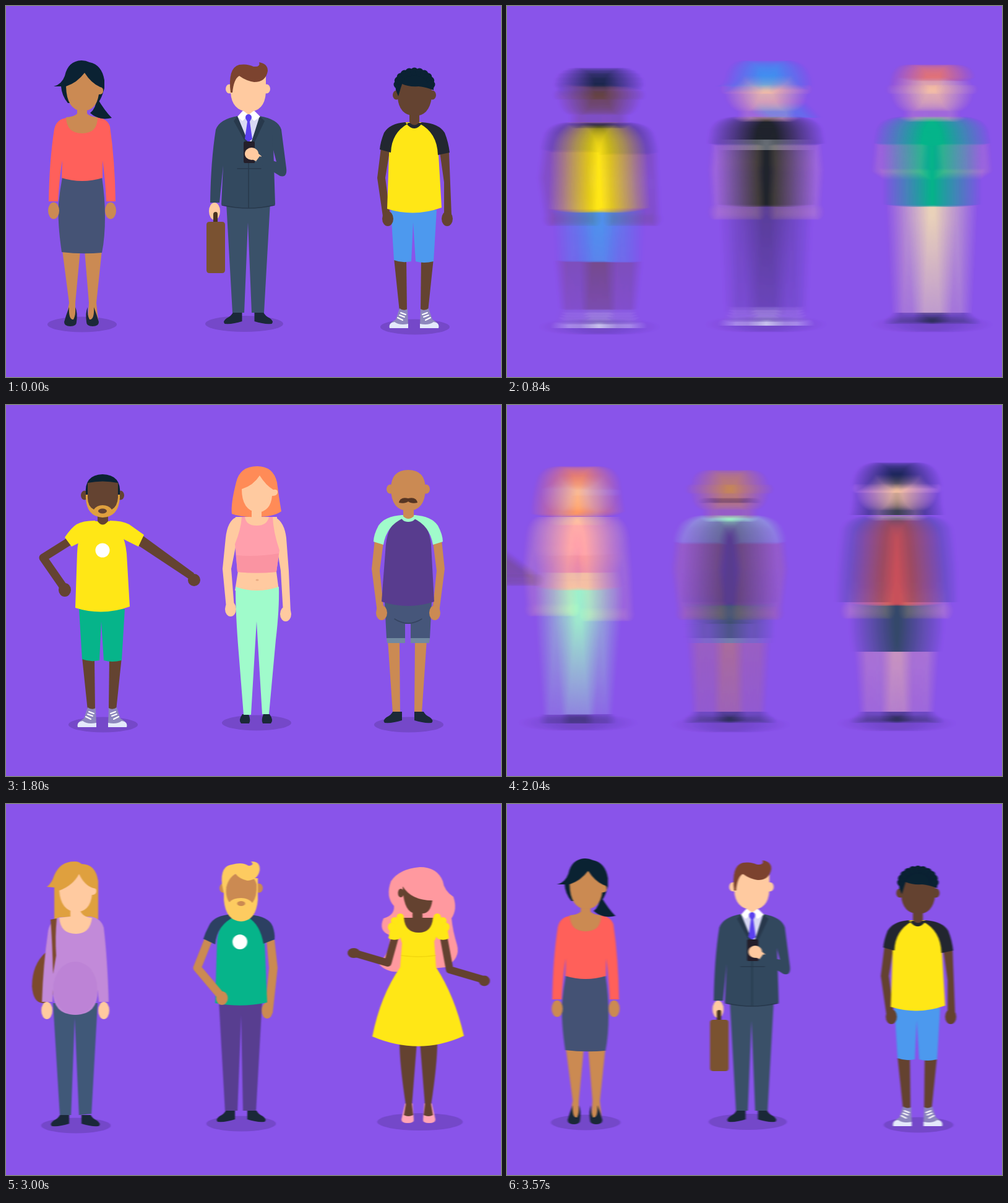
An HTML page with a canvas that plays this animation: 800x600 px, repeating every 3600 ms.

```html
<!DOCTYPE html>
<html lang="en">
<head>
<meta charset="utf-8">
<title>Character parade</title>
<style>
html, body { margin: 0; width: 100%; height: 100%; overflow: hidden; background: #8954ea; }
canvas { display: block; width: 800px; height: 600px; }
</style>
</head>
<body>
<canvas id="stage" width="800" height="600"></canvas>
<script>
const MARGIN = 100, BG = '#8954ea';
const PEACH = '#ffcaa0', TAN = '#cb8a53', BROWN = '#644331';
const INK = '#0b2233', SHOE = '#1b2938', YELLOW = '#ffe716', MINT = '#a0fbcb', GREEN = '#06b48a';

const stage = document.getElementById('stage').getContext('2d');
const makeLayer = () => {
  const c = document.createElement('canvas');
  c.width = 800 + 2 * MARGIN;
  c.height = 600;
  return c.getContext('2d');
};
let front = makeLayer(), back = makeLayer();
let g = front;

// Drawing helpers
const fill = (color, d) => { g.fillStyle = color; g.fill(new Path2D(d)); };
const oval = (color, x, y, rx, ry) => {
  g.fillStyle = color;
  g.beginPath();
  g.ellipse(x, y, rx, ry, 0, 0, 7);
  g.fill();
};
const line = (color, width, d) => {
  g.strokeStyle = color;
  g.lineWidth = width;
  g.lineJoin = g.lineCap = 'round';
  g.stroke(new Path2D(d));
};
const shifted = (x, y, draw) => { g.save(); g.translate(x, y); draw(); g.restore(); };
const both = (axis, draw) => {
  draw();
  g.save();
  g.translate(2 * axis, 0);
  g.scale(-1, 1);
  draw();
  g.restore();
};
const pair = (axis, color, d) => both(axis, () => fill(color, d));
const pairOval = (axis, color, dx, y, rx, ry) => both(axis, () => oval(color, axis - dx, y, rx, ry));
const shadow = (x, y, rx = 56, ry = 12.5) => oval('#7548c9', x, y, rx, ry);

// Shared body parts
const boots = (x, dy = 0) => shifted(x, dy, () =>
  pair(0, SHOE, 'M-25 496H-10V510Q-25 515-38 514Q-42 510-35 505Q-27 501-25 496Z'));
const sneakers = (x, dy = 0) => shifted(x, dy, () => both(-1.5, () => {
  fill('#8d87bd', 'M-25 489Q-18 494-12 490L-11 517Q-11 521-21 521H-41Q-44 514-31 507Z');
  fill('#e4e9fb', 'M-41 521Q-43 512-33 511Q-25 517-11 514V521Z');
  line('#fff', 2, 'M-28 504L-20 508M-25 500L-17 503M-23 496L-15 499');
}));
const slimLegs = (x, color) => shifted(x, 0, () =>
  pair(-2, color, 'M-34 408H-14L-13 494H-25Z'));
const shorts = (x, color) => fill(color,
  `M${x - 39} 330h74l-5 83q-16 4-29 0l-4-63l-3 63q-15 3-28-2Z`);
const tee = (x, color) => fill(color,
  `M${x - 16} 188q-25 12-26 52l-3 88q44 14 88-2l-5-86q-4-40-27-52Z`);
const ears = (x, y, dx, color) => pairOval(x, color, dx, y, 6, 7.5);

// Short-lived figures that pass between the stops
function walker(o) {
  const waist = o.waist || 321;
  shadow(0, 515);
  if (o.hem) {
    pair(0, o.skin, 'M-34 375H-12L-11 499H-25Z');
    fill(o.bottom, o.skirt
      ? `M-37 315H37Q42 360 34 ${o.hem}H-34Q-42 360-37 315Z`
      : `M-39 320H38L34 ${o.hem}H4L0 352L-4 ${o.hem}H-34Z`);
  } else fill(o.bottom, `M-36 ${waist}H36L27 499H7L0 345L-7 499H-27Z`);
  o.sneakers ? sneakers(1.5, -4) : boots(0);
  if (o.mane) fill(o.hair, o.mane);
  if (o.folded) both(0, () => line(o.skin, 12, 'M-50 220L-54 265L-8 296'));
  else {
    pair(0, o.skin, 'M-51 215L-56 265L-51 335H-38L-43 268L-36 222Z');
    pairOval(0, o.skin, 47, 333, 9, 13);
  }
  fill(o.top, `M-15 181Q-38 190-41 225L-40 ${waist}Q0 ${waist + 8} 40 ${waist}L41 225Q38 190 15 181Z`);
  if (o.band) {
    const [color, y, height] = o.band;
    g.fillStyle = color;
    g.fillRect(-38, y, 76, height);
  }
  pair(0, o.sleeve || o.top, o.long
    ? 'M-12 179Q-45 180-53 200Q-62 260-62 319H-44L-36 230Q-36 195-11 182Z'
    : 'M-12 179Q-45 180-52 200L-56 222L-38 227Q-36 195-11 182Z');
  fill(o.skin, 'M-8 160H8V178Q14 180 16 181Q0 194-16 181Q-12 180-8 178Z');
  ears(0, 135, 30, o.skin);
  oval(o.skin, 0, 139, 29, 33);
  fill(o.hair, o.cut || 'M-30 130Q-30 96-6 95Q28 92 31 115Q22 124 8 121Q-8 120-16 115Q-25 120-26 138Z');
}
const CURLS = 'M0 96Q-44 98-50 135Q-36 155-58 180Q-72 200-54 220Q-74 250-48 270H48Q74 248 55 222Q50 200 52 185Q76 168 64 150Q46 140 44 122Q34 96 0 96Z';
const LONG_HAIR = 'M0 93Q-32 94-36 130Q-34 160-40 178H40Q34 150 36 128Q30 93 0 93Z';
const FRINGE = 'M-30 140Q-34 94 0 93Q34 94 30 136Q12 130 2 112Q-8 130-30 140Z';

// The nine people shown at the stops
function teacher() {
  shadow(123, 515);
  fill(TAN, 'M91 395H120L112 480V508H97L102 480ZM127 395H155L146 480L149 508H132L134 480Z');
  pair(122, SHOE, 'M102 487Q97 500 94 511Q94 518 104 518Q114 518 114 511Q116 496 112 487Q113 500 109 507Q101 508 102 487Z');
  fill('#455375', 'M91 277H155Q160 310 160 340Q160 375 155 399Q122 402 90 398Q83 350 85 320Q87 298 91 277Z');
  pairOval(123, TAN, 46, 331, 9, 13.5);
  fill('#ff605b', 'M99 181Q82 182 78 199Q70 250 69 316H84Q87 270 91 250L90 278Q123 288 156 278V250Q160 275 162 316H177Q176 250 168 195Q164 182 147 180Z');
  fill(INK, 'M148 150Q160 170 171 181Q150 186 136 173Q146 165 146 150ZM77 130Q90 127 95 113Q100 89 122 88Q129 88 135 91Q155 95 159 120V133Q155 148 150 155L100 157Q90 145 89 130Z');
  fill(TAN, 'M97 180Q98 206 123 206Q148 206 148 180Q135 179 131 174V160H115V174Q111 179 97 180Z');
  fill(TAN, 'M97 130Q115 124 127 108Q138 125 152 131Q158 132 157 138Q157 143 150 143Q146 170 123 170Q98 168 97 130Z');
}

function banker() {
  const suit = '#33495f', dark = '#28394c';
  shadow(385, 514, 63, 13);
  boots(391.5);
  fill('#3a5169', 'M356 318H427L417 496H397L391 350L385 496H366Z');
  oval(PEACH, 337, 332, 9, 14);
  fill('#49331f', 'M335 349V337Q335 333 339 333Q342 333 342 337V349Z');
  fill('#7a5231', 'M329 349H349Q354 349 354 354V427Q354 432 349 432H329Q324 432 324 427V354Q324 349 329 349Z');
  fill(suit, 'M374 178Q345 183 339 200Q331 250 330 318H345L351 258L348 321Q392 333 435 321L432 225L445 200Q440 183 410 178Z');
  line(dark, 1.5, 'M349 322Q392 332 434 322M392 220V326M374 263H412');
  fill('#d9d9f4', 'M374 180H411L397 219H388Z');
  fill(dark, 'M374 178L391 219L389 224L368 186ZM410 178L397 219L400 224L418 186Z');
  fill('#5b40ee', 'M387 181Q392 173 397 181L394 187L398 215L392 220L386 215L390 187Z');
  fill(PEACH, 'M384 158H400V176L392 179L384 176Z');
  fill('#fff', 'M374 179L383 169L392 176L401 169L411 179L401 186L392 177L382 186Z');
  oval('#5b40ee', 392, 180, 5, 5);
  fill('#241f2a', 'M386 219H400Q402 219 402 222V254H386Q384 254 384 251V222Q384 219 386 219Z');
  oval(PEACH, 397, 239, 11, 10);
  fill(PEACH, 'M398 248L406 237L413 243L406 252Z');
  fill(suit, 'M432 190L445 200L453 262Q455 278 443 275L404 251L410 243L437 252L430 225Z');
  ears(391, 134, 30, PEACH);
  fill(PEACH, 'M363 112H420V140Q418 171 391 171Q365 169 363 140Z');
  fill('#7c432f', 'M363 140Q358 100 377 95Q390 93 400 98Q412 99 409 91Q423 93 423 105Q420 123 401 123Q388 121 377 113Q368 118 366 140Z');
}

function student() {
  shadow(661, 519);
  slimLegs(661, BROWN);
  sneakers(661);
  shorts(661, '#4d99ee');
  fill(BROWN, 'M606 230L600 278L609 340H621L613 278L620 235ZM701 236L708 285V338H720L716 236Z');
  pairOval(665, BROWN, 48, 344, 9, 12);
  tee(661, YELLOW);
  fill('#222730', 'M645 188Q620 190 611 205Q605 220 604 232L622 237Q623 205 650 190ZM672 188Q700 190 709 205Q715 220 717 237L698 241Q697 205 668 190ZM646 189H673Q660 207 646 189Z');
  fill(BROWN, 'M652 165H668V188Q660 197 652 188Z');
  ears(660, 144, 29, BROWN);
  fill(BROWN, 'M633 122H688V148Q684 178 660 178Q635 176 633 148Z');
  fill(INK, 'M630 136Q626 110 650 104H672Q694 112 691 136Q678 131 667 130Q650 131 640 126L634 146Z');
  for (let i = 0; i < 11; i++) {
    const a = Math.PI * (1 + i / 10);
    oval(INK, 660 + 27 * Math.cos(a), 127 + 21 * Math.sin(a), 6.5, 6.5);
  }
}

function dancer() {
  shadow(157, 517);
  slimLegs(157, BROWN);
  sneakers(157);
  shorts(157, GREEN);
  line(BROWN, 13, 'M103 220L60 247L94 296');
  fill(BROWN, 'M222 212L304 272L298 283L212 226Z');
  oval(BROWN, 95, 299, 10, 11);
  oval(BROWN, 304, 283, 10, 10);
  tee(157, YELLOW);
  fill(YELLOW, 'M144 187Q124 187 114 193Q106 198 95 214L106 229L122 221L150 200ZM168 187Q188 187 199 193L223 210L214 229L192 218L164 200Z');
  fill(BROWN, 'M148 170H165V188Q156 199 148 188Z');
  oval('#fff', 156, 235, 11.5, 11.5);
  ears(156, 146, 29, BROWN);
  fill('#dfa03e', 'M129 135H184V150Q182 181 156 182Q130 180 129 150Z');
  fill(INK, 'M129 145Q126 113 156 112Q187 113 184 145Z');
  fill(BROWN, 'M132 126Q156 121 181 126V150Q180 164 171 169Q166 162 156 162Q147 162 142 169Q132 164 132 150Z');
  oval(BROWN, 156, 171.5, 7, 4);
}

function runner() {
  shadow(405, 514);
  pair(404, SHOE, 'M382 500H392Q396 510 393 515H380Q375 510 382 500Z');
  fill(PEACH, 'M371 182Q358 188 355 215L350 265L356 328H369L364 265L372 225ZM436 182Q450 190 453 215L457 268L460 335H448L444 268L437 225Z');
  oval(PEACH, 363, 330, 9, 12);
  oval(PEACH, 452, 338, 9, 12);
  fill(PEACH, 'M371 181H438V225L436 262L441 300H370L376 262L370 225Z');
  fill(MINT, 'M371 294Q405 306 441 294Q442 330 436 380L425 500H414L405 350L396 501H384L376 400Q371 340 371 294Z');
  oval('#e9ab83', 406, 283, 2.5, 1.5);
  fill('#ff9fac', 'M381 181Q380 200 370 225L374 270Q405 273 437 270L442 235Q432 205 431 181H425Q422 195 405 195Q388 195 386 181Z');
  fill('#fa94a2', 'M372 243Q405 246 441 240L437 270Q405 273 374 270Z');
  fill('#ff8b57', 'M406 99Q378 99 372 125Q363 160 365 176Q380 182 405 181Q432 181 445 172Q441 150 438 125Q432 99 406 99Z');
  fill(PEACH, 'M397 165H413V184H397Z');
  fill(PEACH, 'M381 136Q400 130 410 114Q420 130 432 137Q440 136 439 142Q438 147 430 147Q428 172 406 174Q381 170 381 136Z');
}

function uncle() {
  shadow(651, 517);
  pair(648.5, TAN, 'M617 380H636L637 498H625Z');
  boots(650);
  fill('#46567a', 'M612 318H688L685 378H654V354H645V378H615Z');
  fill('#7289a0', 'M615 377H645V385H616ZM654 377H685L684 385H654Z');
  line('#35445f', 1.5, 'M628 346Q650 360 672 346');
  pair(650, TAN, 'M596 218L591 265L600 335H611L604 268L610 222Z');
  pairOval(650, TAN, 43, 336, 9, 12);
  fill('#583c8e', 'M640 182Q618 190 614 225L607 318Q650 332 692 318L687 225Q683 190 662 182Z');
  pair(650, MINT, 'M640 178Q612 180 602 195Q594 210 594 221L610 226Q615 195 642 183Z');
  fill(MINT, 'M638 178H663Q662 189 650 189Q639 189 638 178Z');
  fill(TAN, 'M642 162H659V180Q650 188 642 180Z');
  ears(650, 136, 29, TAN);
  fill(TAN, 'M622 136Q622 105 650 105Q678 105 678 136Q677 171 650 171Q623 171 622 136Z');
  pair(650, '#563523', 'M650 151Q637 148 635 158Q645 160 650 156Z');
}

function mother() {
  const lilac = '#c28ad9', navy = '#405879';
  shadow(113, 520);
  boots(112, 7);
  fill(navy, 'M76 322H148L138 501L118 503L111 345L105 503H87Z');
  fill('#7c4a2c', 'M64 240Q42 260 42 295Q44 322 60 322Q78 320 78 290Z');
  pairOval(112, PEACH, 46, 334, 9, 14);
  fill('#dfa03f', 'M66 134Q74 128 78 115Q88 92 112 93Q118 93 122 97Q145 97 149 125V187H78V135Z');
  fill(lilac, 'M88 183Q72 186 68 205Q60 260 58 320H75L76 300Q75 341 112 341Q149 341 148 300L150 320H166Q164 250 158 200Q154 185 137 182Z');
  oval('#bd83d6', 112, 298, 35, 43);
  fill('#7c4a2c', 'M72 187L82 185Q79 215 81 245L76 275Q75 225 72 187Z');
  fill(PEACH, 'M86 184Q88 210 113 210Q136 210 139 184Q120 183 118 165H104V182Z');
  fill(PEACH, 'M86 140Q108 132 118 113Q127 132 141 136Q147 136 146 142Q145 147 139 147Q136 174 113 175Q88 172 86 140Z');
}

function designer() {
  shadow(380, 517);
  boots(380);
  fill('#583e90', 'M344 318H414L404 496H383L380 340L374 496H354Z');
  fill(TAN, 'M421 220H434L439 265L431 338H418L425 265Z');
  oval(TAN, 422, 334, 9, 13);
  fill(GREEN, 'M365 181Q342 195 341 225L338 322Q380 330 422 321L418 225Q412 195 395 182Z');
  line(TAN, 13, 'M326 222L309 265L346 309');
  oval(TAN, 349, 314, 9.5, 11);
  fill('#2c4063', 'M367 178Q335 180 328 197Q322 208 319 218L338 227Q341 195 370 182ZM394 179Q425 182 431 198Q435 210 434 219L416 226Q411 195 391 183Z');
  oval('#fff', 378, 223, 12, 12);
  ears(380, 136, 29, TAN);
  fill('#fdcb61', 'M352 120H407V155Q404 189 380 190Q355 189 352 155Z');
  fill(TAN, 'M357 128Q362 112 380 112Q400 112 405 130Q406 150 398 160Q392 152 380 152Q366 152 361 159Q353 148 357 128Z');
  oval(TAN, 380, 161, 6.5, 4);
  fill('#fdcb61', 'M349 130Q346 100 365 98Q382 93 392 100Q402 99 396 93Q411 92 410 107Q407 123 390 124Q377 121 371 113Q358 120 355 140L352 145Z');
}

function star() {
  shadow(669, 514, 69, 14);
  fill('#ff999f', 'M669 102Q635 105 622 125Q613 150 627 165Q628 180 610 185Q601 205 620 212Q622 240 602 258Q615 274 640 271L710 264Q735 250 729 228Q722 205 720 185Q730 170 723 150Q708 140 706 125Q697 102 669 102Z');
  line(BROWN, 12, 'M629 214L617 257L566 242');
  line(BROWN, 12, 'M707 214L717 268L768 283');
  oval(BROWN, 562, 241, 10, 8);
  oval(BROWN, 773, 286, 9, 8.5);
  pair(666.5, '#ffa4b6', 'M645 484L639 510Q639 516 649 516Q660 516 659 510L657 484Z');
  pair(666.5, BROWN, 'M636 385H664L656 486L658 503Q650 507 643 503L646 486Q636 420 636 385Z');
  fill(BROWN, 'M641 133Q655 156 689 156Q686 177 673 177V184H691V210H643V184H657V176Q642 170 641 133Z');
  oval(BROWN, 638, 144, 4.5, 7);
  fill(YELLOW, 'M634 182Q636 215 640 225L637 264Q605 310 592 376Q668 408 740 375Q725 310 695 264L692 222Q700 210 697 182L690 184Q688 208 667 208Q645 208 643 184Z');
  both(667, () => {
    fill(YELLOW, 'M641 184L624 184L618 217Q626 222 636 218L646 205Z');
    oval(YELLOW, 637, 183, 6, 6);
    oval(YELLOW, 628, 189, 6, 6);
    oval(YELLOW, 623, 199, 6, 7);
  });
  line('#f2d70f', 1.5, 'M639 245Q667 249 694 245');
}

// Stops: camera position, with the ease-in power and weight of the move that follows
const STOPS = [
  { x: 0, power: 2.4, weight: 0.967 },
  { x: 1830, power: 4, weight: 1.777 },
  { x: 3700, power: 2.4, weight: 1.311 }
];
const LOOP = 5790;

const cast = [];
const add = (stop, center, draw, nudge = 0) =>
  cast.push({ x: STOPS[stop].x + center + nudge, draw: () => shifted(-center, 0, draw) });
const pass = (x, look) => cast.push({ x, draw: () => walker(look) });

add(0, 123, teacher); add(0, 392, banker); add(0, 661, student);
pass(930, { skin: PEACH, hair: '#2fa0f2', top: '#20242d', band: ['#6d727b', 216, 17], bottom: '#573c92', sneakers: true,
  mane: 'M20 150L50 180Q30 184 14 172ZM-45 130Q-30 128-28 112Q-22 88 0 88Q34 90 36 130L28 150H-28L-32 130Z', cut: FRINGE });
pass(1198, { skin: PEACH, hair: '#ff8057', top: GREEN, bottom: '#f6e2b4', folded: true });
pass(1460, { skin: TAN, hair: INK, top: '#ff605b', bottom: '#455375', long: true });
pass(1722, { skin: PEACH, hair: '#7c432f', top: '#4d99ee', bottom: '#33495f', hem: 385, sneakers: true });
add(1, 157, dancer); add(1, 405, runner); add(1, 651, uncle);
pass(2750, { skin: PEACH, hair: '#0d2145', top: '#c8505a', sleeve: '#34477c', bottom: '#34496b', long: true,
  hem: 399, skirt: true, mane: LONG_HAIR, cut: FRINGE });
pass(3016, { skin: BROWN, hair: INK, top: YELLOW, bottom: '#583e90' });
pass(3282, { skin: PEACH, hair: '#ff8b57', top: '#4d99ee', bottom: '#33495f', long: true });
pass(3548, { skin: TAN, hair: INK, top: '#f6f4fc', bottom: '#455375', hem: 385, sneakers: true });
add(2, 113, mother, 2); add(2, 380, designer, 2); add(2, 669, star, 2);
pass(4617, { skin: TAN, hair: '#7c432f', top: MINT, bottom: '#455375', long: true });
pass(4862, { skin: PEACH, hair: '#ff8b57', top: '#c28ad9', bottom: '#33495f', mane: LONG_HAIR, cut: FRINGE });
pass(5113, { skin: PEACH, hair: '#6b3845', top: '#f6f4fc', sleeve: '#7db8f5', band: ['#d9bba6', 226, 26], bottom: '#34496b',
  hem: 384, sneakers: true, cut: 'M-29 116Q-28 101 0 101Q28 101 29 116Q0 111-29 116Z' });
pass(5378, { skin: TAN, hair: '#fdc453', top: '#ff5a55', bottom: '#565080', long: true, waist: 283, mane: CURLS, cut: FRINGE });
pass(5646, { skin: PEACH, hair: '#f47a62', top: GREEN, band: ['#087768', 240, 17], bottom: '#4a4a85', long: true });

const FRAME = 30, STEPS = 21, HOLD = 19, SHUTTER = 0.5;

function cameraAt(time) {
  const index = Math.floor(time / 1200) % 3;
  const step = Math.max(0, Math.floor(time % 1200 / FRAME) - HOLD);
  const { x, power, weight } = STOPS[index];
  if (!step) return { x, blur: 0 };
  const left = STEPS - step;
  const ratio = weight * (step / STEPS) ** power / (left / STEPS) ** 2;
  const eased = ratio / (1 + ratio);
  const distance = (index < 2 ? STOPS[index + 1].x : LOOP) - x;
  const speed = distance * eased * (1 - eased) * (power / step + 2 / left);
  return { x: x + distance * eased, blur: SHUTTER * speed };
}

function render(now) {
  const camera = cameraAt(now % 3600);
  g = front;
  g.fillStyle = BG;
  g.fillRect(0, 0, 800 + 2 * MARGIN, 600);
  for (const { x, draw } of cast) {
    const at = (x - camera.x + 400 + LOOP) % LOOP - 400;
    if (at < 1150) shifted(at + MARGIN, 0, draw);
  }
  // Repeated halving averages many shifted copies into a box blur
  for (let shift = camera.blur / 4; shift > 0.3; shift /= 2) {
    back.globalAlpha = 1;
    back.drawImage(front.canvas, -shift, 0);
    back.globalAlpha = 0.5;
    back.drawImage(front.canvas, shift, 0);
    back.globalAlpha = 1;
    [front, back] = [back, front];
  }
  stage.drawImage(front.canvas, -MARGIN, 0);
}

const start = performance.now();
function tick() {
  render(performance.now() - start);
  requestAnimationFrame(tick);
}
tick();
</script>
</body>
</html>
```
